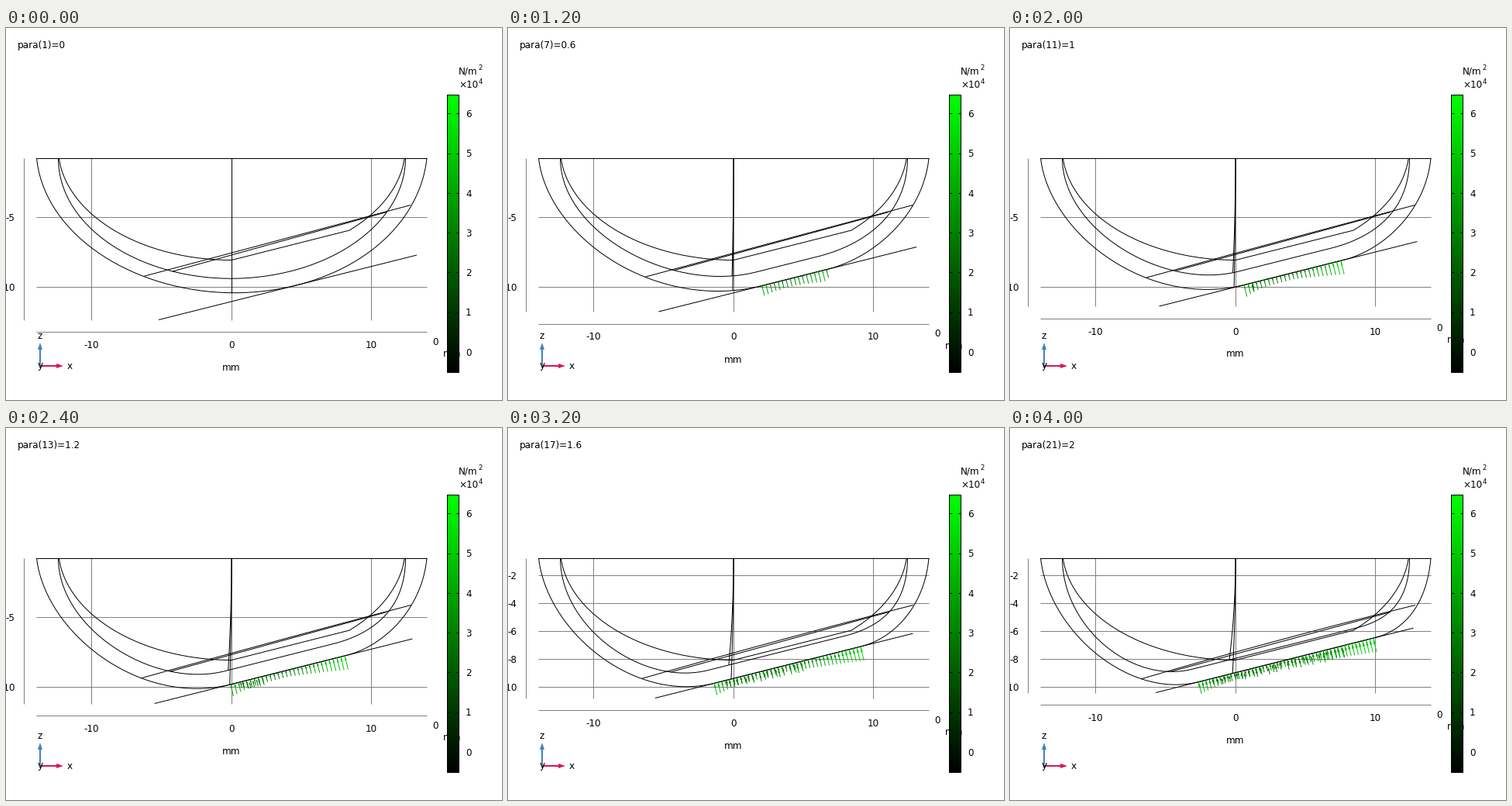
Write a matplotlib script that moves like this. It is 640 px wide and 480 px high and loops after 4.2 s.

```python
import numpy as np
import matplotlib.pyplot as plt
from matplotlib.animation import FuncAnimation
from matplotlib.collections import LineCollection, PolyCollection
from matplotlib.colors import LinearSegmentedColormap

FRAMES, INTERVAL = 21, 200
PX = 0.72                      # one pixel in points at 100 dpi
SLOPE = -0.2507                # tilt of the rigid plane
NORMAL = np.array([0.243, 0.97])
MID_X, TOP = 291, 168
GRAY = "#808080"
GREENS = LinearSegmentedColormap.from_list("greens", ["#000000", "#00ff00"])

plt.rcParams["font.family"] = "DejaVu Sans"
fig = plt.figure(figsize=(6.4, 4.8), dpi=100, facecolor="white")
ax = fig.add_axes([0, 0, 1, 1])


def line(xs, ys, color="black", width=1, z=2):
    ax.plot(xs, ys, color=color, lw=width * PX, zorder=z,
            solid_capstyle="butt")


def label(x, y, text, size=12, ha="left", z=3):
    ax.text(x, y, text, fontsize=size * PX, ha=ha, va="baseline", zorder=z)


def bezier(p0, p1, p2, p3, n=80):
    t = np.linspace(0, 1, n)[:, None]
    a, b, c, d = map(np.array, (p0, p1, p2, p3))
    return ((1 - t)**3 * a + 3 * t * (1 - t)**2 * b
            + 3 * t**2 * (1 - t) * c + t**3 * d)


def plane_y(x, p):
    return 376.5 - 17.5 * p + SLOPE * (x - 197 + 4.5 * p)


def contact(p):
    center, half = 375 - 9 * p, 64 * p**0.83
    return center - half, center + half


def pressed_shell(start, end, left, right, gap, p, pull):
    """Bowl profile with a flat part parallel to the plane."""
    (lx, ly), kl, (rx, ry), kr = pull
    yl, yr = plane_y(left, p) - gap, plane_y(right, p) - gap
    a = bezier(start, (lx, ly), (left - kl, yl - SLOPE * kl), (left, yl))
    b = bezier((right, yr), (right + kr, yr + SLOPE * kr), (rx, ry), end)
    return np.vstack([a, b]).T


def half_ellipse(a, b, cy, x):
    return cy + b * np.sqrt(np.clip(1 - ((x - MID_X - 0.25) / a)**2, 0, 1))


def draw_grid(p):
    drop = -17.5 * p
    bottom = 376.5 + drop
    line([23, 23], [TOP, bottom], GRAY, z=1)
    line([39, 543], [392.3 + drop] * 2, GRAY, z=1)
    for value, x in ((-10, 110), (0, 291), (10, 471)):
        line([x, x], [TOP, bottom], GRAY, z=1)
        label(x + 0.5, 413 + drop, str(value), ha="center")
    step = 5 if p < 1.55 else 2
    for value in range(step, 11, step):
        y = 153.9 + 18.05 * value
        line([39, 543], [y, y], GRAY, z=1)
        label(11.5, y + 5, f"-{value}", ha="right")
    label(291, 442 + drop, "mm", ha="center")
    label(550, 408.7 + drop, "0")
    label(564, 424 + drop, "mm")


def draw_model(p):
    left, right = contact(p)
    ease = p / (p + 1)
    outer = pressed_shell(
        (39.5, TOP), (543, TOP), left, right, 0, p,
        ((52.3 - 1.1 * p, 290 - 36 * p / (p + 0.55)), 155 - 32.5 * p,
         (535 + 1.5 * p, 243.5 - 9 * p), 96 - 84 * ease))
    middle = pressed_shell(
        (67.5, TOP), (515.5, TOP), left - 8, right - 8 - 8.5 * p,
        20 - 0.75 * p, p,
        ((67.5, 275.6 - 31 * ease), 146 - 99 * ease,
         (515.5, 233 - 1.5 * p), 88.5 - 26.5 * p))
    line(*outer)
    line(*middle)

    # Undeformed inner bowl with its straight facet
    xl, xr = np.linspace(68.4, MID_X, 120), np.linspace(443, 514.2, 60)
    line(np.r_[xl, xr],
         np.r_[half_ellipse(224, 145.3, 154.2, xl),
               half_ellipse(224, 145.3, 154.2, xr)])
    line([39, 543], [TOP, TOP])

    # Symmetry edges bending with the shells
    s = np.linspace(0, 1, 30)
    for curve, shift in ((middle, 8 * (p / 2)**1.2), (outer, 1.9 * p)):
        y_end = np.interp(MID_X - shift, *curve)
        line(MID_X - shift * s**2, TOP + (y_end - TOP) * s)

    # Partition edges: the left ends sink with the bulging shells
    sag = 2 * p * p
    for curve, x0, x1, y1, bow in (
            (outer, 177.5, 522 + 0.5 * p, 228.5, 2 * p * p),
            (middle, 215, 491, 237.5, 0)):
        y0 = np.interp(x0 - sag, *curve)
        line(x0 - sag + (x1 - x0 + sag) * s,
             y0 + (y1 - y0) * s - bow * s * (1 - s))
    ends = np.array([197 - 4.5 * p, 530 - 4.7 * p])
    line(ends, plane_y(ends, p))


def draw_arrows(p):
    if p == 0:
        return
    left, right = contact(p)
    spacing = 5.2 - 0.6 * max(0, p - 1)
    x = np.arange(left, right + 1, spacing)
    u = (2 * x - left - right) / (right - left)
    early = np.where(u < 0.88, 12 + np.sin(x * 1.7), 3)
    late = 8.5 + 7 * np.clip(-u, 0, 1)**4 + 10 * np.clip(u, 0, 1)**1.1
    mix = np.clip((p - 0.4) / 0.4, 0, 1)
    length = early + (late - early) * mix
    depth = np.zeros_like(x)

    # A second, deeper row fills the middle as the load grows
    k = np.arange(int(28 * max(0, p - 0.9)))
    spread = (k * 0.618) % 1
    lo, hi = 365 - 52 * p, 190 + 121 * p
    x = np.r_[x, lo + (hi - lo) * spread]
    length = np.r_[length, 6.5 + 3 * p * spread]
    depth = np.r_[depth, 1 + 3 * ((k * 0.414) % 1)]

    tips = np.c_[x, plane_y(x, p)] + depth[:, None] * NORMAL
    tails = tips + length[:, None] * NORMAL
    colors = GREENS(np.clip(0.2 + 0.034 * length, 0, 0.92))
    ax.add_collection(LineCollection(np.stack([tips, tails], 1),
                                     colors=colors, lw=PX, zorder=4))
    size = min(1, 0.35 + 0.35 * p)
    side = np.array([NORMAL[1], -NORMAL[0]]) * 1.5 * size
    neck = tips + 0.42 * size * length[:, None] * NORMAL
    ax.add_collection(PolyCollection(
        np.stack([tips, neck + side, neck - side], 1),
        facecolors=colors, lw=0, zorder=4))


def draw_colorbar():
    x0, x1, y0, y1 = 569, 584, 86, 444
    ax.imshow(np.linspace(0, 1, 256)[:, None], cmap=GREENS,
              extent=(x0, x1, y1, y0), origin="lower", aspect="auto",
              zorder=5)
    line([x0, x1, x1, x0, x0], [y0, y0, y1, y1, y0], z=6)
    for value in range(7):
        y = 418 - 51.3 * value
        line([570, 573], [y, y], z=6)
        line([581, 584], [y, y], z=6)
        label(593, y + 4.7, str(value))
    label(584, 59.4, "N/m")
    label(609, 54.4, "2", 8.5)
    label(584, 77, "×10")
    label(609.5, 72.5, "4", 8.5)


def draw_triad():
    blue, red = "#4682b4", "#dc145a"
    line([44, 44], [436, 413], blue, 2)
    line([44, 67], [436, 436], red, 2)
    ax.fill([44, 41, 47], [406, 415, 415], color=blue, lw=0, zorder=3)
    ax.fill([74, 65, 65], [436, 433, 439], color=red, lw=0, zorder=3)
    ax.plot(44, 436, "o", color="#2e8b57", ms=3 * PX, mew=0, zorder=3)
    label(44, 401, "z", ha="center")
    label(79, 440, "x")
    label(44, 438.5, "y", ha="center")


def draw(i):
    p = i / 10
    ax.clear()
    ax.axis("off")
    draw_grid(p)
    draw_model(p)
    draw_arrows(p)
    draw_colorbar()
    draw_triad()
    label(15, 26, f"para({i + 1})={p:g}")
    ax.set_xlim(0, 640)
    ax.set_ylim(480, 0)
    return []


anim = FuncAnimation(fig, draw, frames=FRAMES, interval=INTERVAL,
                     init_func=lambda: [], repeat=True, repeat_delay=0)
plt.show()
```
